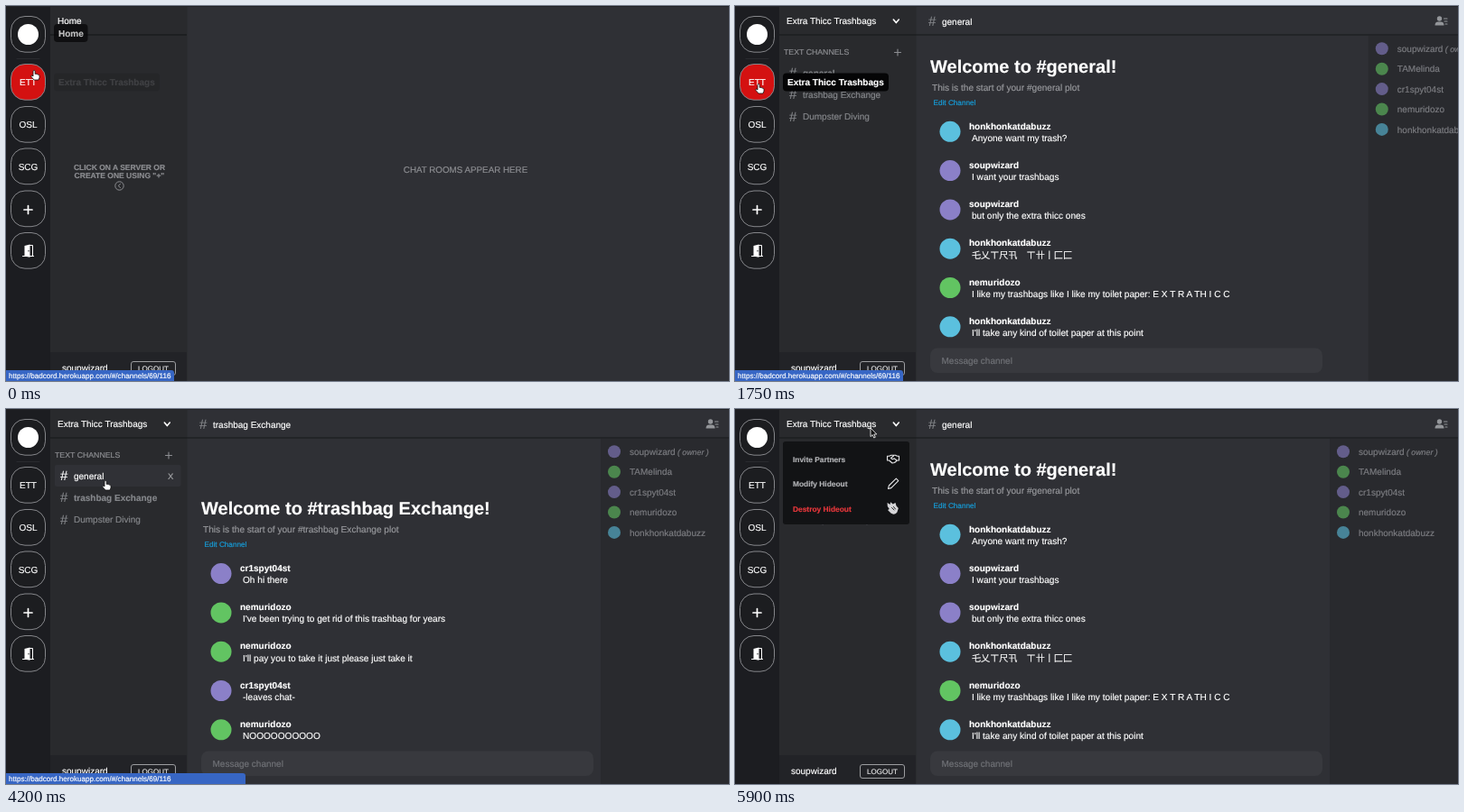
Write an HTML page that moves like this. It is 800 px wide and 416 px high and loops after 5950 ms.

```html
<!DOCTYPE html>
<html lang="en">
<head>
<meta charset="utf-8">
<title>Chat rooms</title>
<style>
html, body { margin: 0; width: 100%; height: 100%; overflow: hidden; background: #2f3035; }
svg { display: block; width: 800px; height: 416px; font: 10px "Liberation Sans", Arial, "Noto Sans CJK JP", "Noto Sans CJK SC", sans-serif; }
text { white-space: pre; stroke-width: .18px; text-rendering: geometricPrecision; }
.b { font-weight: bold; }
.mid { text-anchor: middle; }
.line { fill: none; stroke-linecap: round; stroke-linejoin: round; }
</style>
</head>
<body>
<svg id="stage" viewBox="0 0 800 416"></svg>
<script>
const LOOP = 5950, STEP = 50;
const PURPLE = '#8b80c8', GREEN = '#62c462', CYAN = '#5bc0de';
const USERS = {
  chef: ['soupwizard', PURPLE],
  helper: ['TAMelinda', GREEN],
  toast: ['cr1spyt04st', PURPLE],
  sleepy: ['nemuridozo', GREEN],
  honk: ['honkhonkatdabuzz', CYAN]
};
const CHANNELS = ['general', 'trashbag Exchange', 'Dumpster Diving'];
const CHATS = [
  [
    ['honk', 'Anyone want my trash?'],
    ['chef', 'I want your trashbags'],
    ['chef', 'but only the extra thicc ones'],
    ['honk', '乇乂ㄒ尺卂\u3000ㄒ卄丨匚匚'],
    ['sleepy', 'I like my trashbags like I like my toilet paper: E X T R A TH I C C'],
    ['honk', "I'll take any kind of toilet paper at this point"]
  ],
  [
    ['toast', 'Oh hi there'],
    ['sleepy', "I've been trying to get rid of this trashbag for years"],
    ['sleepy', "I'll pay you to take it just please just take it"],
    ['toast', '-leaves chat-'],
    ['sleepy', 'NOOOOOOOOOO']
  ]
];

const rect = (x, y, w, h, fill, r = 0, more = '') =>
  `<rect x="${x}" y="${y}" width="${w}" height="${h}" rx="${r}" fill="${fill}" ${more}/>`;
const text = (x, y, s, fill = '#fff', size = 10, more = '') =>
  `<text x="${x}" y="${y}" fill="${fill}" stroke="${fill}" font-size="${size}" ${more}>${s}</text>`;
const dot = (x, y, r, fill, more = '') => `<circle cx="${x}" cy="${y}" r="${r}" fill="${fill}" ${more}/>`;
const line = (d, stroke, w = 1, more = '') =>
  `<path class="line" d="${d}" stroke="${stroke}" stroke-width="${w}" ${more}/>`;
const group = (id, inner) => `<g id="${id}">${inner}</g>`;
const BOLD = 'class="b"', MID = 'class="mid"';

const button = (id, y, inner) =>
  rect(5.5, y - 20, 38, 39.7, '#1c1d20', 15.5, `id="${id}" stroke="#85868a"`) + inner;

function serverBar() {
  const label = (y, s) => text(24.5, y + 3.6, s, '#fff', 10, MID);
  const door = line('M18.5 277.5H30.5M26.5 265.5H29.5V277', '#fff', 1) +
    '<path d="M20.5 266L26.5 264.6V278.8L20.5 277.5Z" fill="#fff"/>' + dot(25, 271.8, .7, '#1c1d20');
  return rect(0, 0, 49, 416, '#1c1d21') +
    button('logo', 31.5, dot(24.5, 31.5, 11.5, '#fff')) +
    line('M12 58.5H37', '#292a2f') +
    button('ett', 84.5, label(84.5, 'ETT')) +
    button('osl', 131.5, label(131.5, 'OSL')) +
    button('scg', 178, label(178, 'SCG')) +
    button('add', 225, line('M20 226H29M24.5 221.5V230.5', '#fff', 1.7)) +
    button('exit', 271.5, door);
}

function homeView() {
  const hint = (y, s) => text(125.5, y, s, '#8d8e92', 8.5, 'class="b mid"');
  return text(57, 20, 'Home') + rect(49, 31.5, 151, 1, '#131417') +
    hint(181.7, 'CLICK ON A SERVER OR') + hint(190.5, 'CREATE ONE USING "+"') +
    dot(125.5, 199.5, 4.7, 'none', 'stroke="#8d8e92"') +
    line('M126.5 197.5L124.2 199.5L126.5 201.5', '#8d8e92') +
    text(508.5, 185, 'CHAT ROOMS APPEAR HERE', '#8d8e92', 9.8, MID);
}

function channelRow(name, i) {
  const y = 74 + i * 24.3;
  return group('row' + i, rect(54, y - 12, 139.5, 24, '#303136', 2, 'class="bg"') +
    text(60, y + 5, '#', '#85878b', 15, 'class="hash"') +
    text(75, y + 3.7, name, '#85878b', 10, 'class="name"') +
    text(179, y + 3.7, 'X', '#a5a6a9', 9.5, 'class="x"'));
}

function chat(i) {
  const name = CHANNELS[i], top = i ? 43.3 : 0;
  const rows = CHATS[i].map(([who, said], n) => {
    const y = 136.5 + top + n * 43.3, [user, tint] = USERS[who];
    return dot(238, y + 2.8, 11.5, tint) + text(259, y, user, '#fff', 10, BOLD) +
      text(262, y + 13.2, said, '#fff', 10.1);
  }).join('');
  return group('chat' + i,
    text(214, 22.3, '#', '#85878b', 15) + text(229, 20.8, name) +
    text(216, 74 + top, `Welcome to #${name}!`, '#fff', 20, BOLD) +
    text(218, 93.5 + top, `This is the start of your #${name} plot`, '#97989c', 10.1) +
    text(219.5, 109.7 + top, 'Edit Channel', '#169fdc', 8.2) + rows);
}

function members() {
  const list = Object.values(USERS).map(([user, tint], i) => {
    const y = 47.3 + i * 22.4;
    const owner = i ? '' : '<tspan x="743" font-size="8.8" font-style="italic">( owner )</tspan>';
    return dot(673, y, 7, tint, 'opacity=".6"') + text(690, y + 3.6, user + owner, '#7b7c80');
  }).join('');
  return group('members', rect(658, 33, 143, 383, '#292a2e') + list);
}

function serverView() {
  const people = dot(779.5, 14, 2.7, '#94969a') +
    '<path d="M774.5 21.5Q774.5 17.5 778 17.5H781Q784.5 17.5 784.5 21.5Z" fill="#94969a"/>' +
    line('M784.5 14H788M785 17H788M786 20H788', '#94969a', 1.1);
  return text(57, 20, 'Extra Thicc Trashbags') + line('M175.3 15L178.3 18.6L181.3 15', '#fff', 1.6) +
    text(54, 54.3, 'TEXT CHANNELS', '#8d8e92', 8.75) +
    line('M176.5 51.5H183.5M180 48V55', '#8d8e92', 1.1) +
    CHANNELS.map(channelRow).join('') + chat(0) + chat(1) +
    rect(216, 379.5, 434, 27.5, '#38393e', 8) + text(228.5, 397, 'Message channel', '#707277') +
    members() + rect(49, 31.5, 751, 1, '#17181b') + people;
}

function footer() {
  return rect(49, 384, 151, 32, '#222327') + text(62, 405.3, USERS.chef[0]) +
    rect(138.5, 394.5, 49, 15, 'none', 2.5, 'stroke="#9c9da0"') + text(163, 404.9, 'LOGOUT', '#e4e4e5', 8, MID);
}

function dropdown() {
  const item = (y, s, fill) => text(64, y, s, fill, 8.4, BOLD);
  const grey = '#b2b3b6', pale = '#e6e6e8';
  const shake = line('M168.5 52.3H170.5L173 51.2H177.5L179.5 52.3H181.5M168.5 57H170.5L174 60L176.5 59.5L179.5 57H181.5M175.5 52L172.5 54.5Q174 56.5 176 54.8L179 57M168.5 52.3V57M181.5 52.3V57', pale, 1.1);
  const pencil = line('M169.5 88.5L170.3 85L178.3 77.2L180.8 79.7L172.8 87.6Z', pale, 1.1);
  const fire = '<path d="M168.5 104L171.7 106L172 103.3L174.8 105.6L177.5 104L178.5 107.5L180.8 110L179.3 114.8Q176 118.2 172.5 115.6L169 112L170.8 111L168.8 108Z" fill="#d6d6d8"/>' +
    line('M173.5 109.5L176 112M175.5 108.5L177.5 111', '#121315', .9);
  return rect(53, 36, 140, 92, '#121315', 3) + item(58.7, 'Invite Partners', grey) + item(86.3, 'Modify Hideout', grey) +
    item(113.8, 'Destroy Hideout', '#e8383c') + shake + pencil + fire;
}

const tip = (id, y, s, w) =>
  group(id, rect(53, y - 10, w, 20, '#050506', 4) + text(58, y + 3.6, s, '#fff', 10, BOLD));

const hand = 'M-1 1.2Q0 -.6 1.2 1.2V4.4Q2.3 3.7 3 4.8Q4 4.2 4.7 5.3Q6 5 6 6.6V8.4L5 11H0L-3 7.4Q-3.6 5.8 -2 6L-1 7Z';
const arrow = 'M0 0V9.6L2.2 7.6L3.7 11L5.3 10.3L3.8 7H6.8Z';

const stage = document.getElementById('stage');
stage.innerHTML = rect(0, 0, 800, 416, '#2f3035') + rect(49, 0, 151.5, 416, '#292a2d') + serverBar() +
  group('home', homeView()) + group('server', serverView()) + footer() +
  rect(0, 0, 800, 1, '#222326') + group('menu', dropdown()) +
  tip('tipHome', 30, 'Home', 37.5) + tip('tipEtt', 84.5, 'Extra Thicc Trashbags', 117) + tip('tipOsl', 131.5, 'Ocean Sama Lama', 100) +
  group('status', '<path id="statusBg" fill="#3766c4"/>' + text(3, 412.8, '', '#fff', 8.1, 'id="url"')) +
  group('cursor', `<path id="hand" d="${hand}" fill="#fff" stroke="#111" stroke-width=".8"/>` +
    `<path id="arrow" d="${arrow}" fill="#111" stroke="#fff" stroke-width=".8"/>`);

const $ = id => document.getElementById(id);
const show = (el, on) => el.setAttribute('display', on ? 'inline' : 'none');
const clamp = v => Math.max(0, Math.min(1, v));
const smooth = p => p * p * (3 - 2 * p);
const between = (t, a, b) => t >= a && t < b;
const at = (t, table) => table.filter(row => row[0] <= t).pop()[1];

// Pointer path: time, x, y
const PATH = [
  [0, 31, 71], [200, 28, 87], [300, 28, 87], [600, 26, 120], [1050, 26, 120], [1300, 26, 86],
  [1900, 26, 86], [2400, 114, 97], [3800, 114, 97], [4150, 110, 79], [4850, 110, 79], [5350, 150, 21], [LOOP, 150, 21]
];
const URLS = [[0, '69/116'], [500, '71/121'], [1150, '69/116'], [2100, '69/117'], [4000, '69/116']];
const FADE = 200;
const fade = (t, on, off) => clamp((t - on) / FADE) * (1 - clamp((t - off) / FADE));

function pointer(t) {
  const i = PATH.findIndex(p => p[0] > t), [t0, x0, y0] = PATH[i - 1], [t1, x1, y1] = PATH[i];
  const p = smooth((t - t0) / (t1 - t0));
  return [x0 + (x1 - x0) * p, y0 + (y1 - y0) * p];
}

function paintRow(i, hover, active) {
  const row = $('row' + i), part = c => row.querySelector('.' + c);
  show(part('bg'), hover);
  show(part('x'), hover);
  for (const c of ['hash', 'name']) {
    for (const paint of ['fill', 'stroke']) part(c).setAttribute(paint, hover ? '#fff' : '#85878b');
  }
  part('name').setAttribute('font-weight', active ? 'bold' : 'normal');
}

function render(t) {
  const inServer = t >= 1500;
  show($('home'), !inServer);
  show($('server'), inServer);

  const ettHot = t < 450 || between(t, 1150, 2000), oslHot = between(t, 500, 1150);
  $('ett').setAttribute('fill', ettHot ? '#d41111' : '#1c1d20');
  $('osl').setAttribute('fill', oslHot ? '#d41111' : '#1c1d20');
  $('tipHome').setAttribute('opacity', fade(t, -400, -60));
  $('tipEtt').setAttribute('opacity', Math.max(fade(t, -20, 450), fade(t, 1150, 2000)));
  $('tipOsl').setAttribute('opacity', fade(t, 500, 1100));

  const active = between(t, 2700, 4350) ? 1 : 0;
  show($('chat0'), active === 0);
  show($('chat1'), active === 1);
  const hover = between(t, 2100, 4000) ? 1 : between(t, 4000, 5000) ? 0 : -1;
  CHANNELS.forEach((_, i) => paintRow(i, hover === i, active === i));

  const p = clamp((t - 1560) / 450);
  $('members').setAttribute('transform', `translate(${143 * Math.pow(1 - p, 2.2)} 0)`);

  $('url').textContent = 'https://badcord.herokuapp.com/#/channels/' + at(t, URLS);
  const w = 186 + 79 * clamp((t - 3300) / 150);
  $('statusBg').setAttribute('d', `M0 404H${w - 3}Q${w} 404 ${w} 407V416H0Z`);
  $('status').setAttribute('opacity', 1 - clamp((t - 5050) / 200));
  $('menu').setAttribute('opacity', clamp((t - 5500) / 150));

  const [x, y] = pointer(t), free = t >= 5050;
  $('cursor').setAttribute('transform', `translate(${x} ${y})`);
  show($('hand'), !free);
  show($('arrow'), free);
}

const start = performance.now();
function tick() {
  const t = (performance.now() - start) % LOOP;
  render(Math.floor(t / STEP) * STEP);
  requestAnimationFrame(tick);
}
tick();
</script>
</body>
</html>
```
